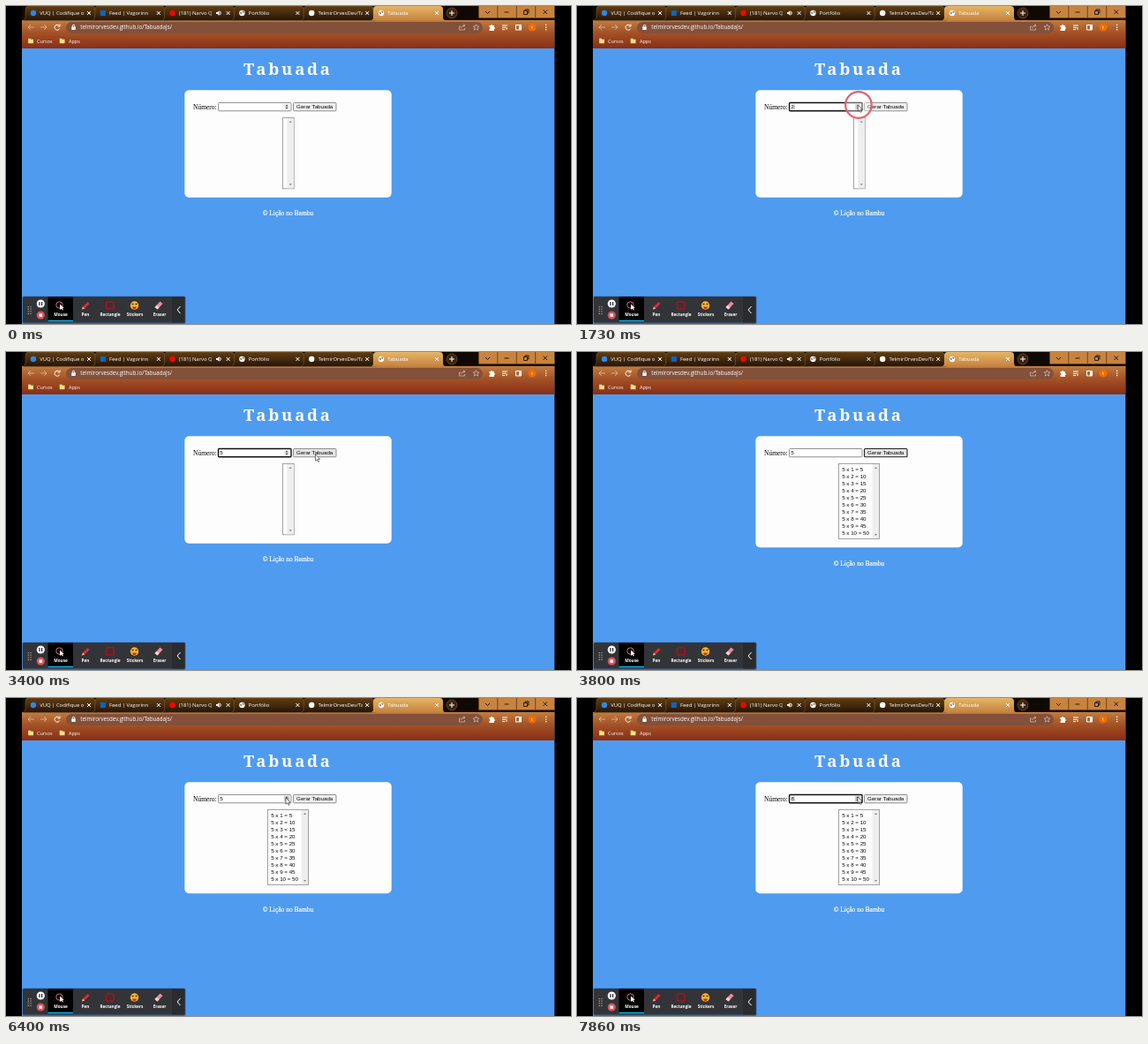
An HTML page that plays this animation: 640 by 360 pixels, repeating every 8000 ms.

```html
<!DOCTYPE html>
<html lang="pt">
<head>
<meta charset="utf-8">
<title>Tabuada</title>
<style>
  html, body { margin: 0; width: 100%; height: 100%; overflow: hidden; background: #000; }
  svg { display: block; width: 100vw; height: 100vh; }
  .ui { font: 500 5.9px "Open Sans", "Noto Sans", sans-serif; fill: #fff; }
  .tool { font: 700 4.7px "Open Sans", sans-serif; fill: #fff; text-anchor: middle; }
  .form { font: 6.2px "Liberation Sans", Arial, sans-serif; fill: #000; }
  .serif { font: 7.5px "Liberation Serif", Times, serif; }
  .line { fill: none; stroke: #fff; stroke-width: 1; }
  .dim { opacity: .45; }
</style>
</head>
<body>
<svg viewBox="0 0 640 360" xmlns="http://www.w3.org/2000/svg">
  <defs>
    <linearGradient id="tab" x2="0" y2="1">
      <stop offset="0" stop-color="#5e3d12"/><stop offset=".5" stop-color="#452a0d"/>
      <stop offset="1" stop-color="#241406"/>
    </linearGradient>
    <linearGradient id="activeTab" x2="0" y2="1">
      <stop offset="0" stop-color="#e6b566"/><stop offset="1" stop-color="#c4823f"/>
    </linearGradient>
    <linearGradient id="bar" x2="0" y2="1">
      <stop offset="0" stop-color="#c17c40"/><stop offset=".45" stop-color="#a35227"/>
      <stop offset="1" stop-color="#8a2d14"/>
    </linearGradient>
    <clipPath id="tabClip"><rect width="50.500" height="16"/></clipPath>
    <clipPath id="shortClip"><rect width="37" height="16"/></clipPath>
    <g id="globe">
      <circle r="3.200" fill="#fff"/>
      <path d="M-2.600-1.200l2 .4 .6 1.400-1.400 1zM.8-2.800l1.800 1.600-1 1.200-1.400-1z" fill="#777"/>
    </g>
    <path id="folder" d="M-2.800-2.800h2.400l1 1h2.400v4.600h-5.800z" fill="#fbe08c"/>
  </defs>

  <rect width="640" height="360"/>
  <rect x="18" width="603.300" height="360" fill="#4f9bf0"/>

  <!-- Browser chrome -->
  <rect x="18" width="603.300" height="17" fill="#100903"/>
  <rect x="18" y="16" width="603.300" height="32" fill="url(#bar)"/>
  <g id="tabs"></g>
  <circle cx="505" cy="8" r="6" fill="#3b2410" stroke="#7d5426" stroke-width=".7"/>
  <path class="line" d="M502 8h6M505 5v6"/>
  <rect x="535.500" width="85.800" height="13.500" fill="#c8843f"/>
  <path d="M556.800 0v13.500M578.300 0v13.500M599.700 0v13.500" stroke="#5a3716" stroke-width=".8"/>
  <path d="M543 6l2.500 2.500L548 6M564.500 7h5M586.500 5.500h4v4h-4zM588 5.500V4h4v4h-1.500M608.500 4.500l4.500 4.500M613 4.500L608.500 9" fill="none" stroke="#1c1006" stroke-width=".9"/>
  <path fill="#fff" d="M238 7h1.500l2-2v6l-2-2H238z"/>
  <path class="line" stroke-width=".7" d="M242.500 6q1.500 2 0 4"/>

  <rect x="68" y="18" width="472" height="13" rx="6.500" fill="#83503a"/>
  <path class="line dim" d="M32 24h-7M28 21l-3 3 3 3M39 24h7M43 21l3 3-3 3"/>
  <path class="line" d="M60.500 22.500a3 3 0 1 0 .3 3M61 20.500v2.500h-2.500"/>
  <path fill="#fff" d="M74.300 23.300h4.400v3.700h-4.400z"/>
  <path class="line" stroke-width=".7" d="M75.300 23.500v-1a1.200 1.200 0 0 1 2.400 0v1"/>
  <text class="ui" x="84.300" y="26.400" style="font-size:6.200px">telmirorvesdev.github.io/TabuadaJs/</text>
  <g class="line" stroke-width=".8">
    <path class="dim" d="M515 23h-1.500v4h6v-2M515.500 25q.5-3 4-3M518 20.500l2 1.500-2 1.500"/>
    <path class="dim" d="M532.500 20.700l1 2.200 2.400.2-1.800 1.600.6 2.400-2.200-1.300-2.200 1.300.6-2.400-1.800-1.600 2.400-.2z"/>
    <path d="M562 22h6M562 24.300h4M562 26.600h3M567 24v3"/>
    <path d="M577.500 21.500h6v5.500h-6z"/>
  </g>
  <path fill="#fff" d="M547.500 22h1.600a1 1 0 0 1 2 0h1.800v2a1 1 0 0 1 0 2v2h-5.400v-2a1 1 0 0 0 0-2zM581 21.500h2.500V27H581z"/>
  <circle cx="596" cy="24" r="4.600" fill="#ef6c00"/>
  <text class="ui" x="596" y="26" text-anchor="middle">t</text>
  <path fill="#fff" d="M611 20.800h1.300v1.300H611zM611 23.400h1.300v1.300H611zM611 26h1.300v1.300H611z"/>
  <use href="#folder" x="28" y="39.500"/><use href="#folder" x="63.500" y="39.500"/>
  <text class="ui" x="35" y="41.500" style="font-size:5.500px">Cursos</text>
  <text class="ui" x="71" y="41.500" style="font-size:5.500px">Apps</text>

  <!-- Page -->
  <text x="269" y="78.300" fill="#fff" font-family="Noto Serif, Liberation Serif, serif" font-weight="700" font-size="18.500" letter-spacing="2.800">Tabuada</text>
  <rect id="card" x="202.300" y="95.300" width="234.400" rx="5" fill="#fdfdfd"/>
  <text id="footer" class="serif" x="319.500" fill="#fff" stroke="#fff" stroke-width=".2" text-anchor="middle">© Lição no Bambu</text>
  <text class="serif" x="212" y="116.500">Número:</text>
  <rect id="input" x="240.500" y="109.500" width="82.500" height="9.300" rx="1" fill="#fff"/>
  <text id="value" class="form" x="242.300" y="116.400"></text>
  <path id="caret" d="M246 111.500v5.500" stroke="#555" stroke-width=".6"/>
  <g id="spin">
    <rect id="spinBox" x="314.800" y="110.800" width="6.500" height="6.700"/>
    <path d="M316.400 113.500l1.600-2 1.600 2zM316.400 114.700l1.600 2 1.600-2z" fill="#444"/>
  </g>
  <rect id="button" x="325.500" y="109.500" width="48.500" height="9.300" rx="1"/>
  <text class="form" x="349.700" y="116.400" text-anchor="middle">Gerar Tabuada</text>
  <g id="list"></g>

  <!-- Recorder toolbar -->
  <rect x="18.500" y="328.500" width="185" height="31.500" rx="2" fill="#1c3a5c" opacity=".5"/>
  <rect x="19" y="329" width="183.500" height="29.500" rx="1.500" fill="#333438"/>
  <rect x="47.500" y="329" width="28.500" height="28.500" fill="#000"/>
  <path d="M47.500 356.500h28.500" stroke="#19b5e8" stroke-width="1.600"/>
  <path d="M25.300 340v9M28 340v9" stroke="#bbb" stroke-width="1.100" stroke-dasharray="1.100 1.500"/>
  <circle cx="39.300" cy="337" r="4.600" fill="#fff"/>
  <path d="M38 335v4M40.600 335v4" stroke="#222" stroke-width="1.200"/>
  <circle cx="39.300" cy="350" r="4.600" fill="#e0505a"/>
  <rect x="37.500" y="348.200" width="3.600" height="3.600" rx=".6" fill="#fff"/>
  <circle cx="60.500" cy="338.500" r="3.700" fill="none" stroke="#d8707a" stroke-width="1"/>
  <path d="M61 337.500v6.500l1.700-1.500 1.200 2 1-.6-1.100-2h2z" fill="#fff"/>
  <path d="M86 343.500l1-3 5.500-5.500 2 2-5.500 5.500z" fill="#e02a36"/>
  <path d="M86 343.500l1-3 2 2z" fill="#f4c9a0"/>
  <rect x="113.500" y="334.800" width="8.500" height="8.200" rx="1" fill="none" stroke="#b00f1a" stroke-width="1.500"/>
  <circle cx="145.500" cy="339" r="4.700" fill="#f8b72c"/>
  <path d="M142.500 337.500h2M146.500 337.500h2" stroke="#4a2b10" stroke-width="1.300"/>
  <path d="M143 340.500h5q-.5 2.500-2.500 2.500t-2.500-2.500" fill="#b72c20"/>
  <path d="M168.500 341l6-6.500 3 2.500-6 6.500z" fill="#ef8d9c"/>
  <path d="M168.500 341l2-2.200 3 2.500-2 2.200z" fill="#f6d5da"/>
  <g id="tools"></g>
  <rect x="188" y="329" width="14.500" height="29.500" fill="#2a2b2f"/>
  <path class="line" stroke-width="1.600" d="M197.500 340l-3.500 4 3.500 4"/>

  <circle id="ring" r="14.800" fill="#fff" fill-opacity=".35" stroke="#e0626b" stroke-width="2.200"/>
  <path id="cursor" d="M0 0v7.200l1.700-1.500 1.300 2.700 1.200-.6-1.300-2.600h2.300z" fill="#fff" stroke="#222" stroke-width=".6"/>
</svg>
<script>
const LOOP = 8000;
const $ = id => document.getElementById(id);
const set = (id, attrs) => {
  for (const key in attrs) $(id).setAttribute(key, attrs[key]);
};
const show = (id, on) => set(id, { visibility: on ? 'visible' : 'hidden' });

const dot = color => `<circle r="3.2" fill="${color}"/>`;
const square = color => `<rect x="-3" y="-3" width="6" height="6" fill="${color}"/>`;
const globe = '<use href="#globe"/>';
const tabs = [
  [dot('#2f86e8'), 'VUQ | Codifique o s'],
  [square('#0a66c2'), 'Feed | Vagorinn'],
  [dot('#f00'), '(181) Narvo Qu', 'shortClip'],
  [globe, 'Portfólio'],
  [dot('#fff'), 'TelmirOrvesDev/Tab'],
  [globe, 'Tabuada']
];
$('tabs').innerHTML = tabs.map(([icon, label, clip = 'tabClip'], i) => {
  const x = 22 + 78.8 * i;
  const active = i === tabs.length - 1;
  const shape = `M${x - 3} 16.500q3-1 3-4V4q0-4 4-4h71q4 0 4 4v8q0 4 3 4.500z`;
  return `<path d="${shape}" fill="url(#${active ? 'activeTab' : 'tab'})" stroke="${active ? 'none' : '#8b632c'}" stroke-width=".5"/>
    <g transform="translate(${x + 9} 8)">${icon}</g>
    <g transform="translate(${x + 16.2} 0)" clip-path="url(#${clip})"><text class="ui" y="10">${label}</text></g>
    <path class="line" stroke-width=".8" d="M${x + 70} 6l4 4m0-4l-4 4"/>`;
}).join('');

$('tools').innerHTML = ['Mouse', 'Pen', 'Rectangle', 'Stickers', 'Eraser']
  .map((name, i) => `<text class="tool" x="${62 + 28 * i}" y="351.200">${name}</text>`).join('');

function listBox(x, width, height, rows) {
  const right = x + width, mid = right - 4, bottom = 126.5 + height;
  const options = Array.from({ length: rows }, (_, i) =>
    `<text class="form" x="${x + 3.7}" y="${135.1 + 8 * i}">5 x ${i + 1} = ${5 * (i + 1)}</text>`);
  return `<rect x="${x}" y="126.500" width="${width}" height="${height}" fill="#fff" stroke="#999" stroke-width=".9"/>
    <rect x="${right - 8}" y="127" width="7.500" height="${height - 1}" fill="#eee"/>
    <path d="M${mid - 1.6} 132l1.600-1.900 1.600 1.900zM${mid - 1.6} ${bottom - 5.5}l1.600 1.900 1.600-1.900z" fill="#8a8a8a"/>
    ${options.join('')}`;
}
const emptyList = listBox(313.5, 12.7, 80.3, 0);
const fullList = listBox(296.5, 46, 85, 10);

// [press time, value]
const presses = [[1500, 1], [1680, 2], [1860, 3], [2040, 4], [2460, 5],
  [6900, 6], [7120, 7], [7680, 8]];
const GENERATE = 3470;
// [time, x, y] of the pointer tip
const path = [[60, 338, 121], [240, 321, 115], [1000, 321, 115], [1001, 317.5, 111.5],
  [1130, 318, 112], [2600, 318.5, 112], [3100, 350, 115.5], [3400, 350.5, 116],
  [5640, 350, 116], [5860, 326, 119], [6200, 326, 119], [6400, 317, 113],
  [6530, 318, 112], [8000, 318, 112]];

function pointer(t) {
  const next = path.findIndex(p => p[0] > t);
  if (next < 1) return path[next < 0 ? path.length - 1 : 0].slice(1);
  const [t0, x0, y0] = path[next - 1], [t1, x1, y1] = path[next];
  const k = (t - t0) / (t1 - t0);
  return [x0 + (x1 - x0) * k, y0 + (y1 - y0) * k];
}

let listed = null;
function draw(t) {
  const press = presses.filter(p => p[0] <= t).pop();
  const age = press ? t - press[0] : Infinity;
  const filled = t >= 3600;
  const focused = (t >= 1500 && t < GENERATE) || t >= 6900;
  const [x, y] = pointer(t);
  const visible = t >= 60 && (t < 3790 || t >= 5630);
  const overInput = x < 323 && y < 119;
  const overButton = x > 325 && y < 119;
  const clicking = t >= GENERATE && t < GENERATE + 130;
  const active = t >= GENERATE && t < 6200;

  set('card', { height: filled ? 126 : 121.4 });
  set('footer', { y: filled ? 242 : 237.4 });
  if (listed !== filled) {
    $('list').innerHTML = filled ? fullList : emptyList;
    listed = filled;
  }

  $('value').textContent = press ? press[1] : '';
  show('caret', focused && age < 500);
  set('input', { stroke: focused ? '#101010' : '#858585', 'stroke-width': focused ? 1.4 : .9 });
  show('spin', focused || overInput || t < 1000);
  set('spinBox', { fill: overInput && t >= 1000 ? '#c9c9c9' : '#efefef' });
  set('button', {
    fill: clicking ? '#f5f5f5' : overButton && t > 60 ? '#e5e5e5' : '#efefef',
    stroke: active ? '#222' : '#858585',
    'stroke-width': active ? 1.1 : .9
  });

  show('cursor', visible);
  set('cursor', { transform: `translate(${x} ${y})` });
  show('ring', clicking || age < 120);
  set('ring', { cx: x + .7, cy: y });
}

const start = performance.now();
function tick(now) {
  draw(Math.max(0, now - start) % LOOP);
  requestAnimationFrame(tick);
}
draw(0);
requestAnimationFrame(tick);
</script>
</body>
</html>
```
